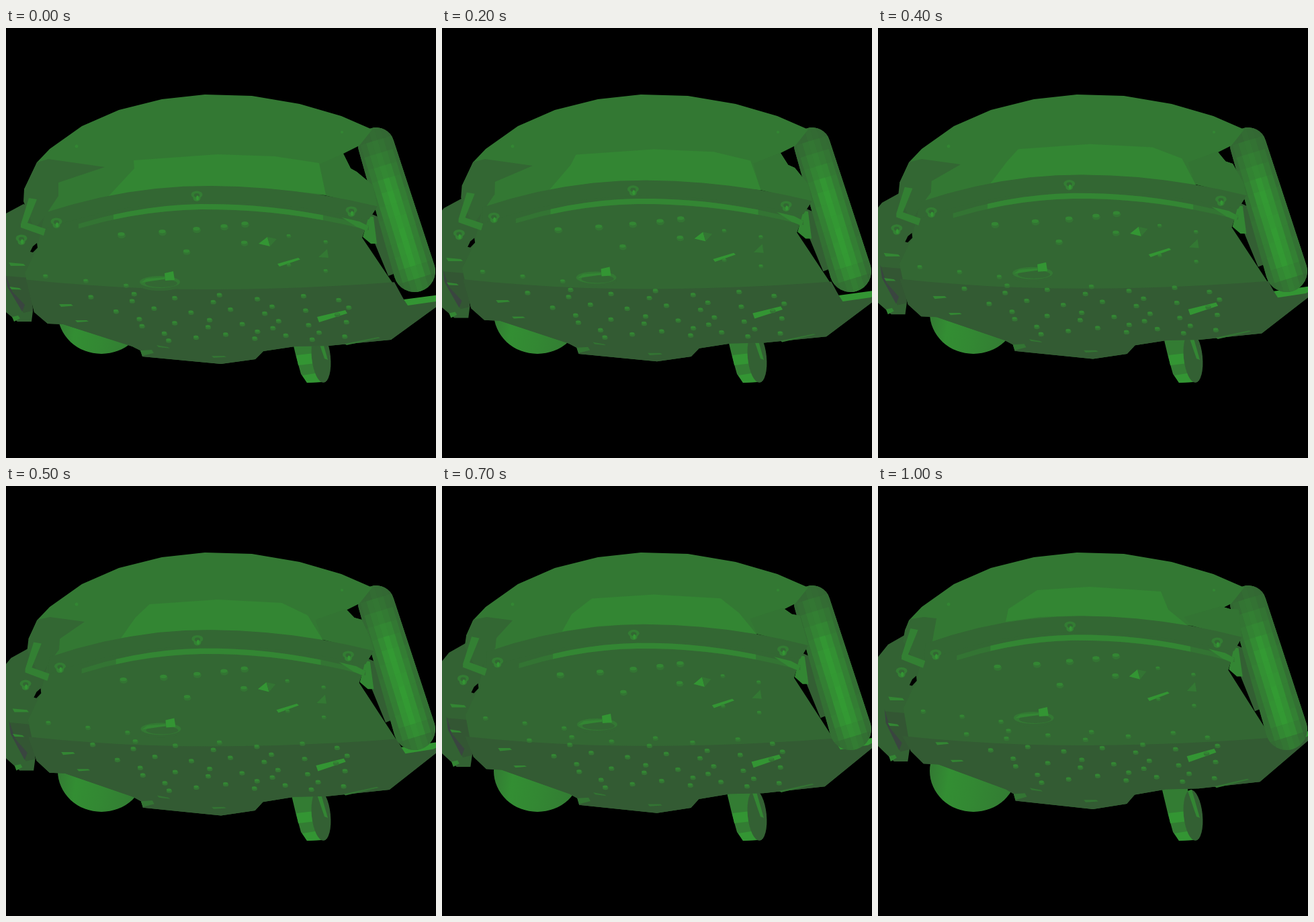
Recreate the animation shown at these times as an HTML page with a canvas. Size 640 by 640 pixels, loop 2100 ms.

```html
<!DOCTYPE html>
<html lang="en">
<head>
<meta charset="utf-8">
<title>Tilting hull</title>
<style>
  html, body { margin: 0; width: 100%; height: 100%; overflow: hidden; background: #000; }
  canvas { display: block; width: 640px; height: 640px; }
</style>
</head>
<body>
<canvas id="stage" width="640" height="640"></canvas>
<script>
const ctx = document.getElementById('stage').getContext('2d');
const LOOP = 2100, STEP = 100, LAST = 10;
const green = g => `rgb(51,${Math.round(g)},51)`;
const LOWER = green(91), UPPER = green(103), MID = green(116), DOME = green(120),
      LIGHT = green(134), BRIGHT = green(149);
let p = 0;

// The hull tilts backwards: points rise and draw in, less so further down.
function tilt(x, y) {
  const u = y - 251;
  const pull = 0.046 - 0.00015 * (y - 280);
  return [x + (320 - x) * pull * p, y + (-41 + 0.0358 * u + 0.000211 * u * u) * p];
}
const blend = (from, to) => from.map((v, i) => v + (to[i] - v) * p);
function tilted(pts) {
  const out = [];
  for (let i = 0; i < pts.length; i += 2) out.push(...tilt(pts[i], pts[i + 1]));
  return out;
}

// Points of a shallow bow that peaks at x = 300 and is flatter on the right.
function bow(y, curve, from, to) {
  const out = [], count = 12;
  for (let i = 0; i <= count; i++) {
    const x = from + (to - from) * i / count, d = x - 300;
    out.push(x, y + curve * d * d * (d > 0 ? 0.7 : 1));
  }
  return out;
}

function poly(color, pts) {
  ctx.beginPath();
  for (let i = 0; i < pts.length; i += 2) ctx.lineTo(pts[i], pts[i + 1]);
  ctx.fillStyle = color;
  ctx.fill();
}
const part = (color, ...pts) => poly(color, tilted(pts));
const bar = (color, x, y, w, rise, h) =>
  part(color, x, y, x + w, y + rise, x + w + 3, y + rise + h * 0.6, x + 3, y + h);
function oval(color, x, y, rx, ry, turn = 0) {
  ctx.beginPath();
  ctx.ellipse(x, y, rx, ry, turn, 0, Math.PI * 2);
  ctx.fillStyle = color;
  ctx.fill();
}
function stud(x, y, r) {
  [x, y] = tilt(x, y);
  oval(MID, x, y + 1, r, r * 0.7);
  oval(LIGHT, x - 0.5, y - r * 0.2, r * 0.85, r * 0.45);
}

function drawBall() {
  const shade = ctx.createLinearGradient(78, 440, 205, 460);
  shade.addColorStop(0, green(124));
  shade.addColorStop(0.2, green(142));
  shade.addColorStop(0.5, green(136));
  shade.addColorStop(1, green(122));
  oval(shade, 142, 424, 65, 61);
}

function drawLeg() {
  poly(green(124), [420, 440, 460, 440, 468, 527, 448, 528, 439, 515, 432, 490]);
  poly(BRIGHT, [432, 487, 458, 484, 462, 499, 435, 502]);
  poly(BRIGHT, [441, 517, 466, 513, 470, 527, 448, 528]);
  oval(green(96), 469, 490, 14, 38, -0.1);
  poly(LIGHT, [461, 454, 467, 452, 479, 494, 474, 492]);
}

function drawWing() {
  part(green(98), -20, 300, 0, 276, 26, 262, 60, 275, 50, 328, 34, 365, 40, 421, 38, 437,
    17, 437, -16, 410);
  part(green(86), 0, 369, 36, 372, 40, 421, 26, 424, 8, 392);
  part('#3a4540', -1, 366, 2, 385, 24, 422, 28, 412, 9, 392);
}

function drawHull() {
  const rim = bow(235, 0.00068, 58, 553);
  const right = [540, 285, 530, 312, 592, 404, 598, 411, 668, 395];
  const bottom = [573, 464, 480, 473, 430, 474, 383, 481, 371, 493, 320, 500, 203, 489,
    200, 480, 188, 474, 85, 441, 62, 440, 42, 423];
  part(green(95), 528, 270, 575, 290, 588, 362, 569, 369);
  part(UPPER, ...rim, ...right, ...bottom, 28, 365, 46, 328);
  poly(LOWER, [...bow(389 - 3 * p, -0.0002, 30 + 6 * p, 578 + 7 * p),
    ...tilted([...right.slice(4), ...bottom])]);
  part('#000', 36, 333, 40, 325, 46, 320, 47, 327, 40, 334);
  part(BRIGHT, 592, 404, 668, 394, 640, 407, 598, 413);
  part(LIGHT, 531, 311, 540, 280, 547, 281, 552, 321, 543, 321);
}

// Tapered capsule with facets, lightest along its middle.
function drawCapsule() {
  const length = 195.5, r0 = 27, r1 = 31, rows = 13, cols = 7;
  ctx.save();
  ctx.translate(551, 175);
  ctx.rotate(Math.atan2(187, 57));
  ctx.beginPath();
  ctx.arc(0, 0, r0, Math.PI / 2, Math.PI * 1.5);
  ctx.arc(length, 0, r1, -Math.PI / 2, Math.PI / 2);
  ctx.fillStyle = green(110);
  ctx.fill();
  ctx.clip();
  const w = (length + r0 + r1) / rows, h = 2 * r1 / cols;
  for (let r = 0; r < rows; r++) for (let c = 0; c < cols; c++) {
    const across = (c + 0.5) / cols * 2 - 1;
    const along = Math.min(1, 0.1 + r * 0.2, (rows - r) * 0.4);
    ctx.fillStyle = green(100 + 52 * along * Math.exp(-2.2 * across * across) + (r * 3 + c * 5) % 4);
    ctx.fillRect(-r0 + r * w, -r1 + c * h, w + 0.7, h + 0.7);
  }
  ctx.restore();
}

function drawDome() {
  const bandRight = [
    ...blend([502, 187, 513, 209, 522, 214, 546, 234], [510, 179, 524, 183, 537, 184, 541, 226]),
    ...tilt(553, 267)];
  const bandFoot = bow(237, 0.00068, 58, 540);
  poly(DOME, [...blend([27, 240], [40, 215]), 46, 200, 65, 180, 113, 146, 168, 122, 232, 106,
    296, 99, 366, 101, 437, 113, 499, 131, 545, 151, 526, 175, 502, 187,
    ...bandRight, ...tilt(475, 249), ...tilted(bandFoot.slice(0, 14).reverse().flatMap(
      (v, i, all) => i % 2 ? [v, all[i - 1]] : []))]);
  poly(MID, [...blend([466, 203], [455, 195]), ...bandRight, ...tilt(475, 249)]);
  poly(UPPER, blend(
    [46, 200, 63, 195, 147, 207, 78, 230, 78, 250, 58, 280, 42, 300, 26, 258, 27, 240],
    [48, 198, 68, 195, 87, 197, 82, 225, 80, 237, 70, 247, 60, 270, 37, 231, 40, 215]));
  poly(LIGHT, blend(
    [190, 197, 315, 188, 400, 191, 466, 201, 476, 248, 390, 239, 300, 235, 220, 240, 152, 251, 191, 209],
    [237, 155, 315, 150, 421, 157, 432, 184, 470, 215, 390, 199, 300, 193, 240, 195, 190, 202, 194, 183]));
  oval(LIGHT, 105, 176, 2.5, 2.5);
  oval(LIGHT, 500, 155, 2, 2);
}

function drawRim() {
  const crescent = (color, from, to) => part(color,
    ...bow(262, 0.0008, from, to), ...bow(270, 0.00077, to, from));
  part(UPPER, ...bow(235, 0.00068, 58, 553), 540, 285, ...bow(258, 0.0007, 535, 58));
  crescent(MID, 108, 540);
  crescent(LIGHT, 160, 472);
  part(LIGHT, 500, 282, 526, 288, 540, 295, 537, 302, 522, 296);
}

function drawDisk() {
  const [x, y] = tilt(229, 379);
  oval(UPPER, x, y + 4, 30, 8);
  oval(DOME, x, y - 1, 30, 9);
  oval(UPPER, x + 2, y + 1, 24, 6);
  poly(LIGHT, [x - 28, y, x - 20, y - 6, x + 7, y - 8, x + 7, y - 5, x - 8, y - 3]);
  poly(BRIGHT, [x + 7, y - 14, x + 20, y - 17, x + 22, y - 4, x + 8, y - 3]);
}

function drawBolt(bx, by) {
  const [x, y] = tilt(bx, by);
  oval(green(124), x, y - 2, 8.5, 5.5);
  oval(green(128), x, y + 3, 5.5, 5);
  oval(UPPER, x, y - 1, 4, 3);
  oval(BRIGHT, x + 1, y + 3, 2, 3.5);
}

function drawStuds() {
  for (let i = 0; i < 5; i++) stud(172 + 66 * i - 5 * i * i, 308 - 4 * i, 6);
  for (let i = 0; i < 2; i++) {
    stud(269 + 86 * i, 333 - 13 * i, 5.5);
    for (let j = 0; j < 2; j++) stud(421 + 55 * i, 309 + 43 * j + 9 * i, 3.5);
  }
  for (let i = 0; i < 3; i++) stud(59 + 60 * i, 369 + 7 * i, 4);
  // Evenly scattered rivets across the narrowing underside.
  for (let i = 1; i <= 38; i++) {
    const y = 394 + 76 * (i * 0.7549 % 1);
    const left = 62 + 2.2 * (y - 394);
    stud(left + (515 - left) * (i * 0.5698 % 1), y, 4.2);
  }
}

function drawMarks() {
  bar(BRIGHT, 404, 351, 31, -9, 4);
  bar(BRIGHT, 463, 430, 42, -10, 8);
  bar(LIGHT, 79, 411, 18, 0, 4);
  bar(LIGHT, 103, 435, 17, 0, 3);
  bar(MID, 504, 470, 50, -10, 2);
  bar(MID, 224, 472, 17, 3, 3);
  bar(MID, 306, 488, 19, 0, 3);
  bar(MID, 200, 480, 17, -1, 8);
  bar(LIGHT, 4, 349, 22, 2, 5);
  bar(LIGHT, 5, 385, 15, 2, 4);
  bar(LIGHT, 9, 430, 9, -2, 7);
  part(BRIGHT, 376, 321, 389, 311, 393, 325);
  part(MID, 389, 311, 403, 314, 393, 325);
  part(DOME, 465, 341, 478, 329, 480, 342);
  part(green(128), 22, 292, 34, 253, 46, 255, 32, 290, 59, 299, 56, 309, 22, 297);
}

function draw() {
  ctx.fillStyle = '#000';
  ctx.fillRect(0, 0, 640, 640);
  drawBall();
  drawLeg();
  drawWing();
  drawHull();
  drawCapsule();
  drawDome();
  drawRim();
  drawMarks();
  drawStuds();
  drawDisk();
  for (const [x, y] of [[284, 250], [75, 290], [514, 273], [23, 315]]) drawBolt(x, y);
}

const start = performance.now();
function frame() {
  const time = (performance.now() - start) % LOOP;
  p = Math.min(LAST, Math.floor(time / STEP)) / LAST;
  draw();
  requestAnimationFrame(frame);
}
frame();
</script>
</body>
</html>
```
